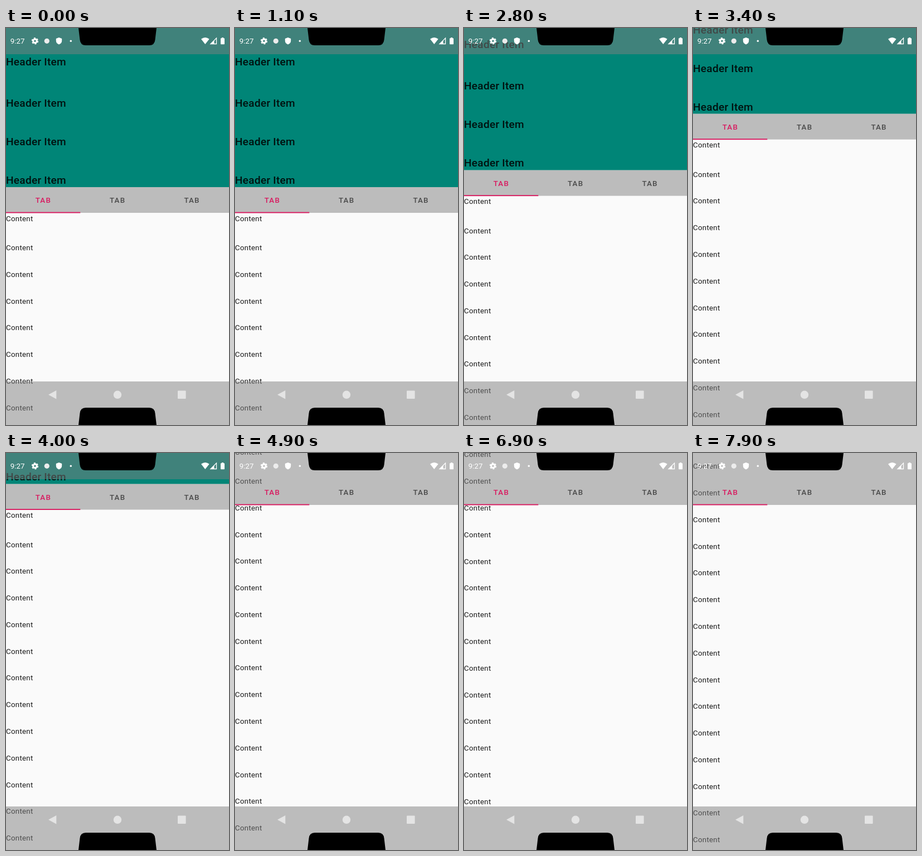
These frames come from a looping animation (400x711 px, 8 s). An HTML page:

```html
<!DOCTYPE html>
<html lang="en">
<head>
<meta charset="utf-8">
<title>Sticky tabs</title>
<style>
  html, body { margin: 0; width: 100%; height: 100%; overflow: hidden; background: #fafafa; }
  svg { display: block; width: 400px; height: 711px; font-family: Roboto, sans-serif; }
  .item { font-size: 13.37px; letter-spacing: .0178571em; fill: #1c1c1c; }
  .head { font-size: 19.1px; font-weight: 500; letter-spacing: .0125em; fill: #00110f; }
  .tab { font-size: 13.37px; font-weight: 500; letter-spacing: .0892857em; fill: #4a4a4a; }
  .on { fill: #d81b60; }
  .scrim { fill: rgba(128, 128, 128, .5); }
  .status { fill: #fff; }
  .line { fill: none; stroke: #fff; }
  .nav { fill: #e4e4e4; }
  .clock { font-size: 13.4px; }
</style>
</head>
<body>
<svg viewBox="0 0 400 711">
  <g id="list">
    <rect width="400" height="285" fill="#008577"/>
  </g>

  <g id="tabs">
    <rect class="scrim" y="285" width="400" height="46"/>
    <text class="tab on" x="52.8" y="313.4">TAB</text>
    <text class="tab" x="186.1" y="313.4">TAB</text>
    <text class="tab" x="319.5" y="313.4">TAB</text>
    <rect class="on" y="329.6" width="133.3" height="1.9"/>
  </g>

  <rect class="scrim" width="400" height="47"/>
  <rect class="scrim" y="633" width="400" height="78"/>

  <g class="status">
    <text class="clock" x="7.8" y="28.3">9:27</text>
    <circle class="line" cx="52" cy="23.3" r="3.3" stroke-width="3"/>
    <circle class="line" cx="52" cy="23.3" r="5.2" stroke-width="2" stroke-dasharray="2.9 2.545"/>
    <circle cx="73.3" cy="23.3" r="4.6" fill="#ececec"/>
    <path d="M95 17l5.2 2v4q0 4.5-5.2 6.5q-5.2-2-5.2-6.5v-4z"/>
    <circle cx="116.3" cy="23.3" r="1.7"/>
    <path d="M350 19.8q7.3-5.6 14.6 0L357.3 29z"/>
    <path class="line" d="M377.5 18v10.5h-10.5z" stroke-width="1.3"/>
    <path d="M373.5 22v7h-7z"/>
    <path d="M387 17h3v1.3h1.2q.8 0 .8.8v9.4q0 .8-.8.8h-5.4q-.8 0-.8-.8v-9.4q0-.8.8-.8h1.2z"/>
  </g>

  <g class="nav">
    <path d="M76 656.8L90.3 649v15.5z"/>
    <circle cx="200" cy="656.8" r="7.2"/>
    <rect x="308" y="649.6" width="14.6" height="14.4" rx="1"/>
  </g>

  <path id="notch" d="M130 0L132.5 21Q133.5 31 143 31H257Q266.5 31 267.5 21L270 0Z"/>
  <use href="#notch" transform="matrix(1 0 0 -1 0 711)"/>
</svg>

<script>
  const LOOP = 8000, STEP = 100, PIN = 238;
  const list = document.getElementById('list');
  const tabs = document.getElementById('tabs');

  function addText(cls, y, label) {
    const el = document.createElementNS('http://www.w3.org/2000/svg', 'text');
    el.setAttribute('class', cls);
    el.setAttribute('y', y);
    el.textContent = label;
    list.append(el);
  }

  // The first row of each group has a little extra space below it.
  function addRows(cls, label, count, first, second, gap) {
    for (let i = 0; i < count; i++) {
      addText(cls, i ? second + gap * (i - 1) : first, label);
    }
  }

  addRows('head', 'Header Item', 4, 66.8, 140.9, 69);
  addRows('item', 'Content', 20, 345.8, 398, 47.78);

  // [time in ms, scroll offset in px]
  const scroll = [
    [0, 0], [2500, 0], [2800, 30.4], [3600, 165], [4000, 229.5],
    [4900, 343], [5000, 350], [5100, 350], [5300, 420], [5600, 550],
    [5800, 607], [6000, 629.4], [6900, 629.4], [7200, 590],
    [7300, 590], [7900, 513], [LOOP, 513]
  ];

  function offsetAt(t) {
    const i = scroll.findIndex(key => key[0] > t);
    const [t0, y0] = scroll[i - 1], [t1, y1] = scroll[i];
    return y0 + (y1 - y0) * (t - t0) / (t1 - t0);
  }

  const shift = (el, y) => el.setAttribute('transform', `translate(0 ${-y})`);

  function draw() {
    const t = Math.floor(performance.now() % LOOP / STEP) * STEP;
    const y = offsetAt(t);
    shift(list, y);
    shift(tabs, Math.min(y, PIN));
    requestAnimationFrame(draw);
  }
  draw();
</script>
</body>
</html>
```
